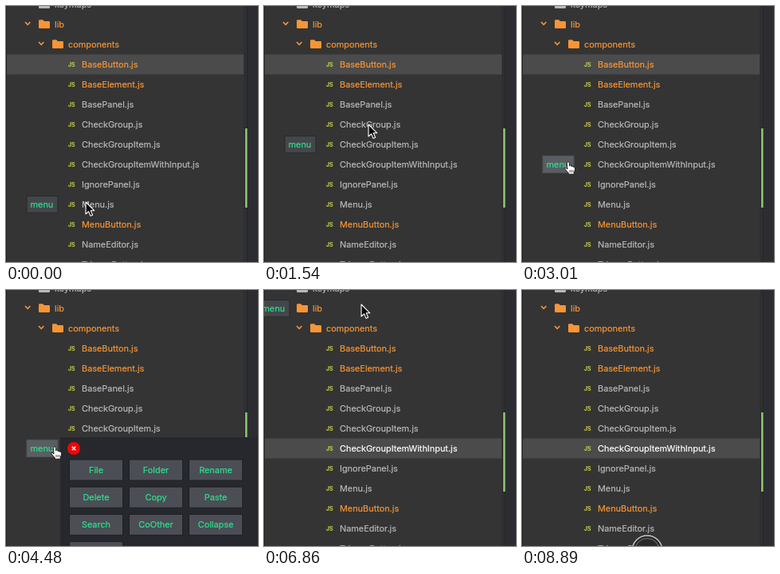
Animation, 316 px wide and 320 px high, one loop 8960 ms. Source, as an HTML page:

```html
<!DOCTYPE html>
<html lang="en">
<head>
<meta charset="utf-8">
<title>File tree menu</title>
<style>
  html, body { margin: 0; width: 100%; height: 100%; overflow: hidden; background: #333; }
  svg { display: block; width: 100vw; height: 100vh; }
  text { font: 10.9px Inter, Roboto, sans-serif; stroke-width: .2; }
</style>
</head>
<body>
<svg id="stage" viewBox="0 0 316 320" xmlns="http://www.w3.org/2000/svg">
  <rect width="316" height="320" fill="#343434"/>
  <rect id="band" height="25" fill="#4b4b4b"/>
  <rect width="1" height="320" fill="#202020"/>
  <rect x="298" width="5" height="320" fill="#2f2f30"/>
  <rect x="302" width="14" height="320" fill="#2b2d33"/>
  <rect x="302" width="1" height="320" fill="#232428"/>
  <rect x="300" y="153" width="2.5" height="99" fill="#8fc86c"/>
  <g id="tree"></g>
  <g id="popup">
    <rect x="68" y="184" width="248" height="136" fill="#26282d"/>
    <circle cx="85" cy="198" r="8" fill="#f20505"/>
    <path d="M82.8 195.8l4.4 4.4m0-4.4l-4.4 4.4" stroke="#fff" stroke-width="1.4"/>
  </g>
  <g id="menu">
    <rect x=".5" y="-10.5" width="39" height="21" stroke-width="1.2"/>
    <text x="5" y="3.5" fill="#2fe08f" stroke="#2fe08f">menu</text>
  </g>
  <path id="arrow" d="M0 0V15L3.5 11.8L6 17.4L8.6 16.2L6.2 10.8H10.8Z" fill="#0a0a0a" stroke="#fff" stroke-width="1.1" stroke-linejoin="round"/>
  <g id="hand" fill="#fff" stroke="#111" stroke-width=".9" stroke-linejoin="round">
    <path d="M-1.7 1.2Q-1.5-.4 0-.2Q1.3 0 1.4 1.5L1.7 5.2Q3-.1 3.9 5.5Q5.4 4 6.2 6.2Q8.4 5.2 8.5 8Q8.7 11.2 7.2 13.2V15.2H.2V13.6Q-2.2 11.4-4 8.7Q-4.5 7-2.8 7.3L-1 9Z"/>
    <path d="M2 10v3M4 10v3M6 10v3" fill="none" stroke-width=".7"/>
  </g>
  <g id="ring" fill="none">
    <circle cx="157" cy="326" r="19" fill="#222" fill-opacity=".55" stroke="#c9c9c9" stroke-width="1.4"/>
    <circle cx="157" cy="326" r="15.5" stroke="#777" stroke-width="1"/>
  </g>
</svg>
<script>
const LOOP = 8960, STEP = 70, ROW = 25, TOP = 23, LAG = 240;
const OPEN = 3430, CLOSE = 5740, EXIT = 8400;
const ORANGE = '#f89535', GREY = '#b9b9b9', GREEN = '#2fe08f';
const $ = id => document.getElementById(id);

function add(parent, tag, attrs, label) {
  const el = document.createElementNS('http://www.w3.org/2000/svg', tag);
  for (const key in attrs) el.setAttribute(key, attrs[key]);
  if (label) el.textContent = label;
  parent.appendChild(el);
  return el;
}
const set = (el, attrs) => { for (const key in attrs) el.setAttribute(key, attrs[key]); };
const show = (el, on) => el.setAttribute('visibility', on ? 'visible' : 'hidden');
const rowY = i => TOP + i * ROW;

function label(parent, x, y, text, color, more) {
  return add(parent, 'text', { x, y, fill: color, stroke: color, ...more }, text);
}

function folder(x, row, name, color, open) {
  const y = rowY(row), tree = $('tree');
  add(tree, 'path', {
    d: `M${x} ${y - 4.5}q0-1.2 1.2-1.2h4l1.6 1.8h6q1.2 0 1.2 1.2v6.5q0 1.2-1.2 1.2h-11.6q-1.2 0-1.2-1.2z`,
    fill: color
  });
  if (open) add(tree, 'path', {
    d: `M${x - 17} ${y - 3}l3.2 3.3l3.2-3.3`, fill: 'none', stroke: color, 'stroke-width': 1.6
  });
  label(tree, x + 20, y + 4, name, color);
}

folder(41, -1, 'keymaps', GREY, false);
folder(41, 0, 'lib', ORANGE, true);
folder(58, 1, 'components', ORANGE, true);

const files = ['BaseButton', 'BaseElement', 'BasePanel', 'CheckGroup', 'CheckGroupItem',
  'CheckGroupItemWithInput', 'IgnorePanel', 'Menu', 'MenuButton', 'NameEditor', 'TriggerButton'];
const changed = [0, 1, 8, 10];
const names = files.map((file, i) => {
  const y = rowY(i + 2);
  label($('tree'), 78, y + 3, 'JS', '#c9cf45',
    { style: 'font-size:7px;font-weight:600', 'stroke-width': 0 });
  return label($('tree'), 95, y + 4, file + '.js', changed.includes(i) ? ORANGE : GREY);
});

['File', 'Folder', 'Rename', 'Delete', 'Copy', 'Paste', 'Search', 'CoOther', 'Collapse', 'Close']
  .forEach((name, i) => {
    const x = 79.5 + i % 3 * 75, y = 212 + Math.floor(i / 3) * 34.2;
    add($('popup'), 'rect', { x, y, width: 67, height: 26, fill: '#4b4e55', stroke: '#1e2024' });
    label($('popup'), x + 33.5, y + 17, name, GREEN, { 'text-anchor': 'middle' });
  });

// Pointer path: time, x, y
const path = [
  [0, 100, 245], [1540, 131, 148], [1820, 133, 130], [2730, 58, 195], [3990, 58, 195],
  [4480, 61, 196], [4830, 61, 196], [5390, 85, 198], [5600, 85, 198], [5880, 88, 192],
  [6650, 122, 18], [6860, 122, 18], [7560, 125, 190], [8260, 150, 316], [LOOP, 157, 326]
];

function pointer(t) {
  let i = 0;
  while (i < path.length - 2 && t >= path[i + 1][0]) i++;
  const [t0, x0, y0] = path[i], [t1, x1, y1] = path[i + 1];
  let p = (t - t0) / (t1 - t0);
  if (i) p = p * p * (3 - 2 * p);
  return [x0 + (x1 - x0) * p, y0 + (y1 - y0) * p];
}

function menuRow(t) {
  if (t >= OPEN && t < CLOSE) return 7;
  return Math.round((pointer(Math.max(0, t - LAG))[1] - TOP) / ROW);
}

function draw(t) {
  const [x, y] = pointer(t);
  const open = t >= OPEN && t < CLOSE;
  const picked = t >= CLOSE, partial = picked && t < 6020;
  const inside = t < EXIT;

  show($('band'), !open);
  set($('band'), {
    x: partial ? 25 : 1,
    width: partial ? 262 : 300,
    y: rowY(picked ? 7 : 2) - 12.5
  });
  const tone = picked ? '#fff' : GREY;
  set(names[5], { fill: tone, stroke: tone });
  show($('popup'), open);

  const row = menuRow(t);
  const left = 26 - 16.5 * Math.max(0, 2 - Math.max(0, row));
  const overMenu = x < left + 40 && Math.abs(y - rowY(row)) < 11;
  const overClose = open && Math.hypot(x - 85, y - 198) < 8;
  show($('menu'), inside);
  set($('menu'), { transform: `translate(${left - .5} ${rowY(row)})` });
  set($('menu').firstElementChild, {
    fill: overMenu ? '#595e63' : '#44474a',
    stroke: overMenu ? '#4e5357' : '#2b2d30'
  });

  const hand = overMenu || overClose;
  show($('hand'), inside && hand);
  show($('arrow'), inside && !hand);
  set($(hand ? 'hand' : 'arrow'), { transform: `translate(${x} ${y})` });
  show($('ring'), t >= 8890);
}

const start = performance.now();
function tick() {
  const t = (performance.now() - start) % LOOP;
  draw(Math.floor(t / STEP) * STEP);
  requestAnimationFrame(tick);
}
tick();
</script>
</body>
</html>
```
